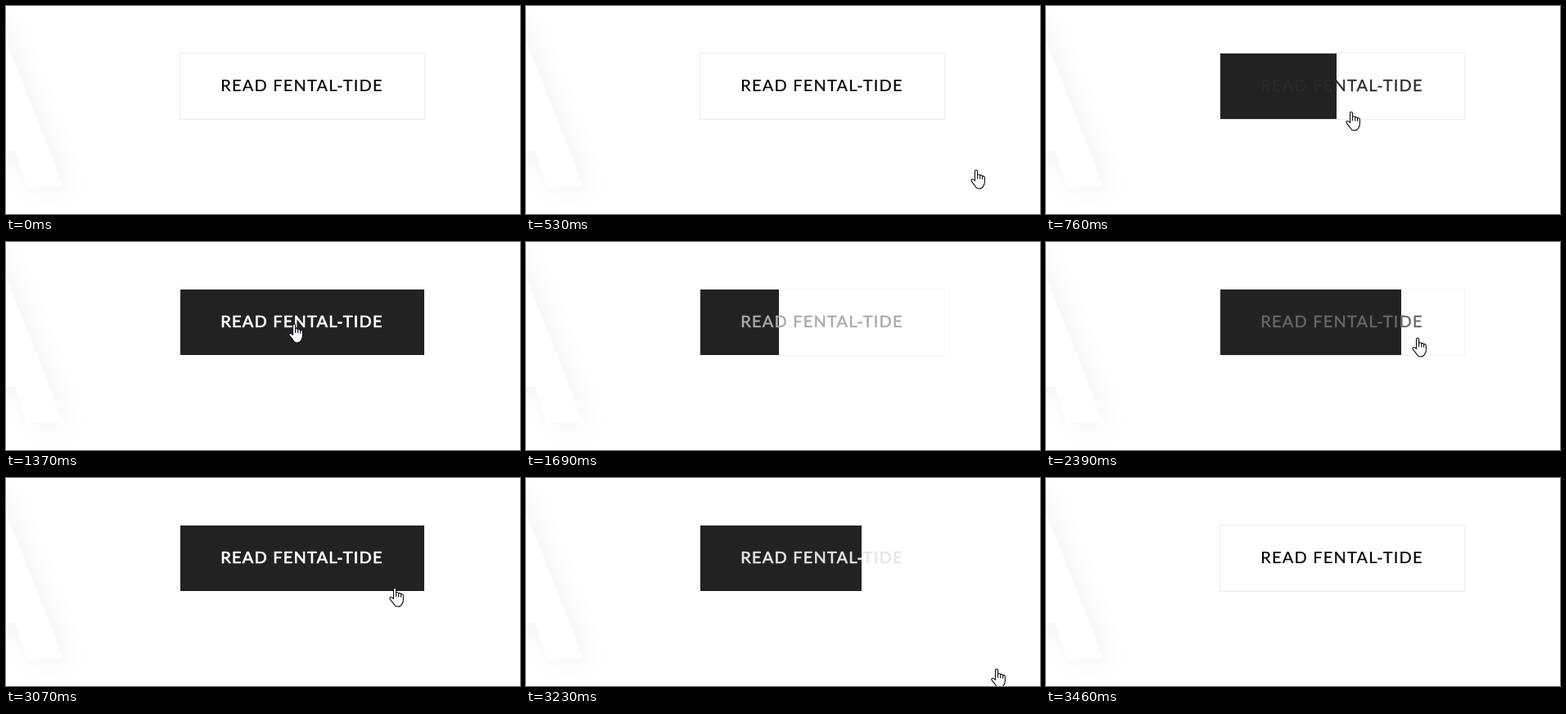
Write an HTML page with a canvas that moves like this. It is 628 px wide and 254 px high and loops after 3690 ms.

```html
<!DOCTYPE html>
<html lang="en">
<head>
<meta charset="utf-8">
<title>Button hover</title>
<style>
html, body { margin: 0; width: 100%; height: 100%; overflow: hidden; background: #fff; }
canvas { display: block; }
</style>
</head>
<body>
<canvas id="stage" width="628" height="254"></canvas>
<script>
const ctx = document.getElementById('stage').getContext('2d');
const LOOP = 3690;
const STEP = LOOP / 48;   // the picture advances 13 times a second
const LEAD = 14;
const FADE = 290;
const LABEL = 'READ FENTAL-TIDE';
const BOX = { x: 213, y: 58, w: 298, h: 80 };

// Pointer visits: it slows down into the button, rests, then speeds away.
// hover: when the button is entered and left; bend: easing powers for x and y.
const VISITS = [
  {
    hover: [687, 1576],
    come: { at: 538, end: 999, from: [543, 199], bend: [3.2, 1.8] },
    rest: [345, 99],
    go: { at: 1384, end: 1538, to: [505, 125], bend: [1.6, 1.6] }
  },
  {
    hover: [2254, 3165],
    come: { at: 2152, end: 2537, from: [583, 135], bend: [2.3, 1.9] },
    rest: [428, 112],
    go: { at: 2998, end: 3229, to: [568, 232], bend: [1.15, 1.6] }
  }
];

const clamp = v => Math.min(1, Math.max(0, v));
const progress = (t, { at, end }) => clamp((t - at) / (end - at));

function bezier(x1, y1, x2, y2) {
  const axis = (a, b, s) => 3 * a * s * (1 - s) ** 2 + 3 * b * s * s * (1 - s) + s ** 3;
  return x => {
    let lo = 0, hi = 1;
    for (let i = 0; i < 30; i++) {
      const mid = (lo + hi) / 2;
      if (axis(x1, x2, mid) < x) lo = mid; else hi = mid;
    }
    return axis(y1, y2, lo);
  };
}
const ease = bezier(.25, .1, .25, 1);
const easeInOut = bezier(.42, 0, .58, 1);

function hoverAt(t, curve) {
  const level = start => curve(clamp((t - start) / FADE));
  return VISITS.reduce((sum, { hover: [a, b] }) => sum + level(a) - level(b), 0);
}

function pointerAt(t) {
  const visit = VISITS.find(v => t >= v.come.at && t <= v.go.end);
  if (!visit) return null;
  const { come, rest, go } = visit;
  const far = 1 - progress(t, come), away = progress(t, go);
  return rest.map((r, i) => Math.round(
    r + (come.from[i] - r) * far ** come.bend[i] + (go.to[i] - r) * away ** go.bend[i]));
}

// Large pale letter with a soft shadow, mostly off stage.
function drawLetter() {
  ctx.save();
  ctx.shadowColor = 'rgba(0,0,0,.045)';
  ctx.shadowBlur = 36;
  ctx.shadowOffsetX = 10;
  ctx.shadowOffsetY = 10;
  ctx.fillStyle = '#fff';
  ctx.beginPath();
  [[-60, -5], [-18, -5], [70, 221], [26, 221], [11, 177], [-100, 177], [-115, 221], [-160, 221]]
    .forEach(([x, y]) => ctx.lineTo(x, y));
  ctx.closePath();
  ctx.fill();
  ctx.restore();
}

function drawButton(t) {
  const tone = hoverAt(t, easeInOut);
  const { x, y, w, h } = BOX;
  ctx.lineWidth = 1;
  ctx.strokeStyle = `rgba(236,236,236,${1 - tone})`;
  ctx.strokeRect(x - .5, y - .5, w + 1, h + 1);
  ctx.fillStyle = '#222';
  ctx.fillRect(x, y, Math.round(w * hoverAt(t, ease)), h);

  const grey = Math.round(255 * tone);
  ctx.fillStyle = ctx.strokeStyle = `rgb(${grey},${grey},${grey})`;
  ctx.font = '20px Lato, Carlito, sans-serif';
  ctx.letterSpacing = '1.2px';
  ctx.lineWidth = .2 + .5 * tone;
  ctx.lineJoin = 'round';
  ctx.fillText(LABEL, 262.2, 104);
  ctx.strokeText(LABEL, 262.2, 104);
}

const hand = new Path2D('M5.5 14.5V3Q5.5 1.2 7 1.2T8.6 3V7.6Q9 6.7 10.2 6.8 11.6 6.9 11.7 8.2' +
  'Q12.2 7.5 13.2 7.6 14.5 7.8 14.6 9.1 15.1 8.5 16 8.7 17.4 9 17.4 10.8V15.5' +
  'Q17.4 19 15.6 21.2 14.2 24 10.8 24 7.3 24 6.2 21.4L1.3 15.2Q.3 13.6 1.5 12.8 2.8 12.1 4 13.2Z');
const knuckles = new Path2D('M8.6 7.6V12M11.7 8.2V12.4M14.6 9.1V12.8');

function drawPointer([x, y]) {
  ctx.save();
  ctx.translate(x, y);
  ctx.fillStyle = '#fff';
  ctx.strokeStyle = '#0c0c1c';
  ctx.lineWidth = 1.1;
  ctx.lineJoin = 'round';
  ctx.fill(hand);
  ctx.stroke(hand);
  ctx.stroke(knuckles);
  ctx.restore();
}

function draw(now) {
  const t = Math.floor((now % LOOP + LEAD) / STEP) * STEP;
  ctx.fillStyle = '#fff';
  ctx.fillRect(0, 0, 628, 254);
  drawLetter();
  drawButton(t);
  const spot = pointerAt(t);
  if (spot) drawPointer(spot);
}

const start = performance.now();
function loop() {
  draw(performance.now() - start);
  requestAnimationFrame(loop);
}
loop();
</script>
</body>
</html>
```
